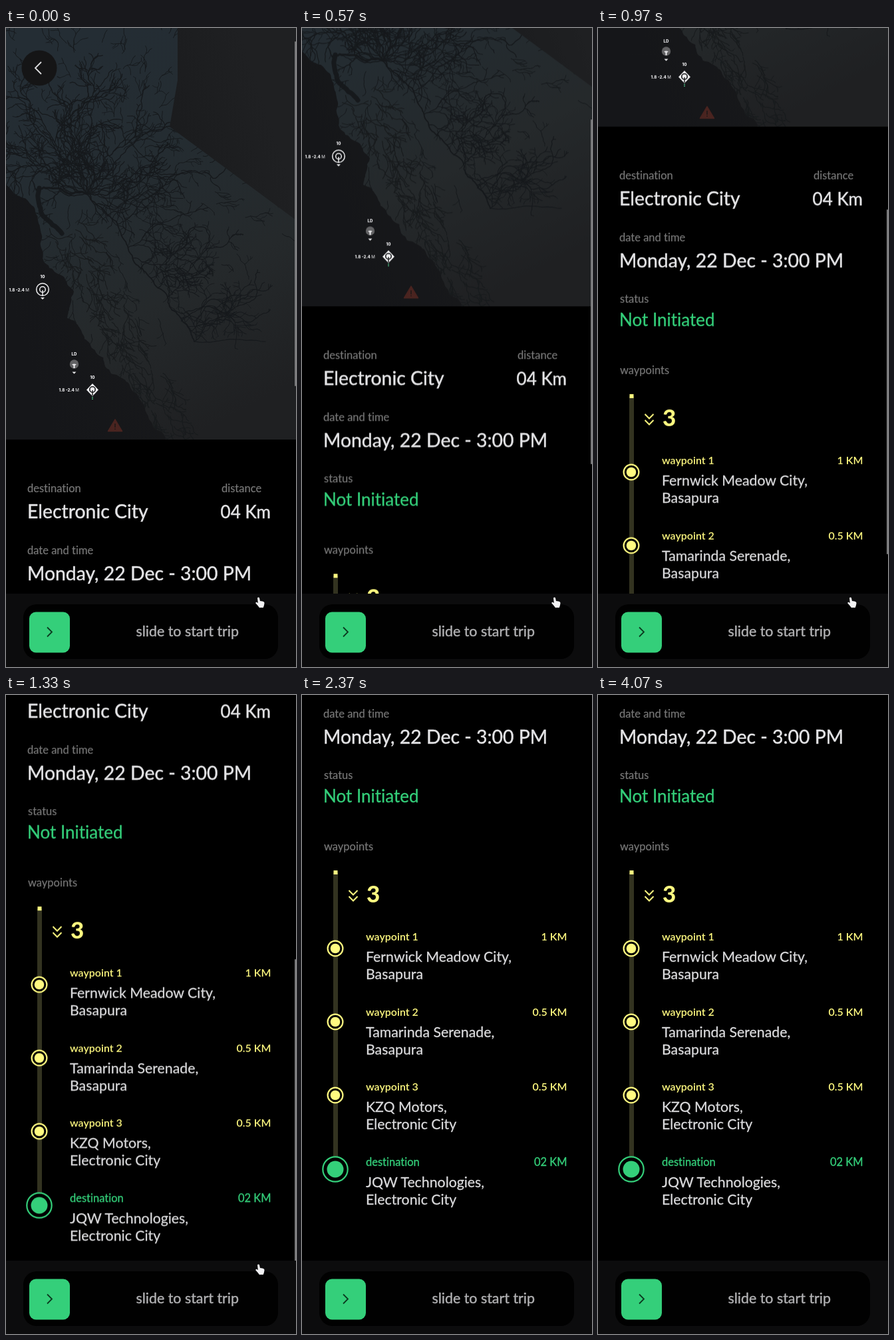
Write an HTML page with a canvas that moves like this. It is 436 by 958 pixels and loops after 4.11 s.

```html
<!DOCTYPE html>
<html lang="en">
<head>
<meta charset="utf-8">
<title>Trip details</title>
<style>
  :root {
    --start: cubic-bezier(.333, .141, .667, .732);
    --glide: cubic-bezier(.333, .434, .667, .726);
    --settle: cubic-bezier(.333, .497, .667, 1);
    --white: #e4e4e6;
    --green: #34cf7a;
    --yellow: #fffa80;
  }
  html, body { margin: 0; width: 100%; height: 100%; overflow: hidden; background: #000; }
  .stage { position: relative; width: 436px; height: 958px; overflow: hidden; background: #000; }
  .page, .page > *, .bar { position: absolute; left: 0; top: 0; }
  .page { animation: scroll 4110ms infinite; will-change: transform; }
  svg { display: block; font-family: Lato, "Open Sans", sans-serif; font-variant-ligatures: none; }
  text { stroke-width: .45px; stroke-linejoin: round; }
  .label { font-size: 16.5px; fill: #787878; stroke: #787878; stroke-width: .2px; }
  .head { font-size: 28.4px; fill: var(--white); stroke: var(--white); }
  .status { font-size: 26px; fill: var(--green); stroke: var(--green); stroke-width: .3px; }
  .name { font-size: 21.3px; fill: #dadadc; stroke: #dadadc; stroke-width: .3px; }
  .stop { font-size: 16px; font-weight: 600; fill: var(--yellow); }
  .goal { font-size: 16.5px; fill: var(--green); stroke: var(--green); stroke-width: .3px; }
  .slide { font-size: 21.4px; fill: #b0b0b2; stroke: #b0b0b2; }
  .mini { font: 800 6.2px Inter, sans-serif; fill: #ececee; }
  .end { text-anchor: end; }
  .mid { text-anchor: middle; }
  .thumb {
    position: absolute; right: 0; top: 0; width: 2px; height: 517px;
    border-radius: 1px; background: #78787a;
    animation: thumb 4110ms infinite, hide 4110ms infinite;
  }
  .hand { animation: hide 4110ms step-end infinite; }

  @keyframes scroll {
    0%, 11.44% { transform: none; animation-timing-function: var(--start); }
    17.03% { transform: translateY(-272px); animation-timing-function: var(--glide); }
    23.6% { transform: translateY(-469px); animation-timing-function: var(--settle); }
    40.88%, 100% { transform: translateY(-755px); }
  }
  @keyframes thumb {
    0%, 10% { transform: translateY(20px); animation-timing-function: ease-in; }
    11.44% { transform: translateY(27px); animation-timing-function: var(--start); }
    17.03% { transform: translateY(177px); animation-timing-function: var(--glide); }
    23.6% { transform: translateY(272px); animation-timing-function: var(--settle); }
    40.88%, 100% { transform: translateY(425px); }
  }
  @keyframes hide { 0%, 46% { opacity: 1; } 51%, 100% { opacity: 0; } }
</style>
</head>
<body>
<div class="stage">
  <div class="page">
    <canvas id="map" width="436" height="617"></canvas>
    <svg width="436" height="1713">
      <circle cx="50" cy="60" r="26.5" fill="#151516"/>
      <path d="M53 51l-9 9 9 9" fill="none" stroke="#dcdcde" stroke-width="1.8"/>

      <g class="mini">
        <text class="mid" x="55" y="375">10</text>
        <text x="4.5" y="394.5">1.8 -2.4 <tspan font-weight="400">M</tspan></text>
        <text class="mid" x="102.5" y="490.5">LD</text>
        <text class="mid" x="130" y="525.5">10</text>
        <text x="79.5" y="545">1.8 -2.4 <tspan font-weight="400">M</tspan></text>
      </g>
      <g fill="none" stroke="#ececee" stroke-width="1.5">
        <circle cx="55" cy="392" r="9.3"/>
        <circle cx="55" cy="392" r="4.3"/>
        <path d="M55 393v9"/>
      </g>
      <path d="M52 404h6l-3 3zM99.5 515.5h6l-3 3z" fill="#ececee"/>
      <circle cx="102.5" cy="504" r="6.7" fill="#626264"/>
      <path d="M99 504.5q3.5-2 7 0l-2.5 1.5v4h-2v-4z" fill="#ececee"/>
      <path d="M130 533l9 9.5-9 9.5-9-9.5z" fill="#f0f0f2"/>
      <circle cx="130" cy="542" r="4.2" fill="none" stroke="#161719" stroke-width="1.6"/>
      <path d="M130 543v8" stroke="#161719" stroke-width="1.4"/>
      <path d="M130 553v1.5m0 1v1.5" stroke="#4fc78a" stroke-width="1.6"/>
      <path d="M164 587l10.5 17.500h-21z" fill="#4a2420" stroke="#4a2420" stroke-width="1.5" stroke-linejoin="round"/>
      <path d="M164 593v6m0 1.500v1.500" stroke="#1a1718" stroke-width="1.4"/>

      <text class="label" x="32" y="696">destination</text>
      <text class="label" x="324" y="696">distance</text>
      <text class="head" x="32" y="734.5">Electronic City</text>
      <text class="head end" x="398" y="734.5" style="font-size:26px">04 Km</text>
      <text class="label" x="32" y="789">date and time</text>
      <text class="head" x="32" y="827.5">Monday, 22 Dec - 3:00 PM</text>
      <text class="label" x="33" y="881">status</text>
      <text class="status" x="32" y="915.5">Not Initiated</text>
      <text class="label" x="33" y="988">waypoints</text>

      <rect x="47" y="1021" width="7" height="430" fill="#333320"/>
      <rect x="47.5" y="1018" width="6" height="6" fill="var(--yellow)"/>
      <path d="M70.5 1048l6.500 6.500 6.500-6.500m-13 9l6.500 6.500 6.500-6.500" fill="none" stroke="var(--yellow)" stroke-width="2"/>
      <text x="97" y="1066" font-size="35" font-weight="800" fill="var(--yellow)">3</text>
      <g id="stops"></g>
    </svg>
  </div>

  <div class="thumb"></div>

  <svg class="bar" width="436" height="958">
    <rect y="848" width="436" height="110" fill="#0c0c0d"/>
    <rect x="26" y="864" width="383" height="82" rx="20" fill="#010101"/>
    <rect x="35" y="875.5" width="61" height="61" rx="10" fill="#34cf7a"/>
    <path d="M62 898.5l7 7-7 7" fill="none" stroke="#0c3a20" stroke-width="1.8"/>
    <text class="slide" x="195.5" y="912">slide to start trip</text>
    <path class="hand" d="M378 854.5q1.600-1.800 3 0l1 4.800 1.300-.4 1.300.7 1.400-.2 1.200.9q1.300.2 1.300 2l-.5 3.200-1.200 3.400h-6l-2.200-3-3.300-3.700q.3-1.800 2-1.200l1.600 1.200z" fill="#f2f2f4"/>
  </svg>
</div>

<script>
const stops = [
  ["waypoint 1", "1 KM", "Fernwick Meadow City,", "Basapura"],
  ["waypoint 2", "0.5 KM", "Tamarinda Serenade,", "Basapura"],
  ["waypoint 3", "0.5 KM", "KZQ Motors,", "Electronic City"],
  ["destination", "02 KM", "JQW Technologies,", "Electronic City"]
];

document.getElementById("stops").innerHTML = stops.map(([title, km, place, area], i) => {
  const goal = i === stops.length - 1;
  const style = goal ? "goal" : "stop";
  const color = goal ? "var(--green)" : "var(--yellow)";
  const y = Math.round(1123 + 112.7 * i);
  const cy = Math.round(1134.500 + 110.400 * i);
  return `<circle cx="50" cy="${cy}" r="${goal ? 18.7 : 11.4}" fill="#000" stroke="${color}" stroke-width="2.2"/>
    <circle cx="50" cy="${cy}" r="${goal ? 12.5 : 7.3}" fill="${color}"/>
    <text class="${style}" x="96" y="${y}">${title}</text>
    <text class="${style} end" x="398.5" y="${y}">${km}</text>
    <text class="name" x="96" y="${y + 32}">${place}</text>
    <text class="name" x="96" y="${y + 58}">${area}</text>`;
}).join("");

const ctx = document.getElementById("map").getContext("2d");
let seed = 71;
const random = () => (seed = seed * 16807 % 2147483647) / 2147483647;
const between = (a, b) => a + (b - a) * random();

function gradient(x0, y0, x1, y1, ...colors) {
  const g = ctx.createLinearGradient(x0, y0, x1, y1);
  colors.forEach((c, i) => g.addColorStop(i / (colors.length - 1), c));
  return g;
}

// Fractal edge from a to b
function rough(a, b, amount) {
  const d = Math.hypot(b[0] - a[0], b[1] - a[1]);
  if (d < 5) return [b];
  const shift = d * amount / 2;
  const mid = a.map((v, i) => (v + b[i]) / 2 + between(-shift, shift));
  return [...rough(a, mid, amount), ...rough(mid, b, amount)];
}

const course = (points, amount = 0.25) =>
  points.flatMap((p, i) => i ? rough(points[i - 1], p, amount) : [p]);

function line(points, width) {
  ctx.lineWidth = width;
  ctx.beginPath();
  points.forEach(p => ctx.lineTo(...p));
  ctx.stroke();
}

// Meandering stream with ever smaller side arms
function creek(x, y, angle, length, width) {
  const points = [[x, y]];
  let a = angle;
  for (let s = 0; s < length; s += 4) {
    a += between(-0.6, 0.6) + (angle - a) * 0.2;
    x += Math.cos(a) * 4;
    y += Math.sin(a) * 4;
    points.push([x, y]);
    if (length > 12 && random() < 0.2) {
      const side = random() < 0.5 ? -0.8 : 0.8;
      creek(x, y, a + side, Math.min(50, (length - s) * 0.6), width * 0.85);
    }
  }
  line(points, width);
}

const delta = [122, 249];
const coast = course([[0, 235], [42, 268], [55, 345], [102, 395], [92, 435], [200, 555], [240, 617]]);
const border = [[436, 617], [436, 288], [246, 148], [258, 78], [258, 0], [0, 0]];

ctx.fillStyle = gradient(0, 400, 436, 250, "#151619", "#18191b", "#1f2022");
ctx.fillRect(0, 0, 436, 617);
ctx.beginPath();
[...coast, ...border].forEach(p => ctx.lineTo(...p));
ctx.fillStyle = gradient(80, 40, 360, 570, "#242d34", "#242c31", "#25292b", "#1f2022");
ctx.fill();
ctx.clip();

ctx.lineJoin = ctx.lineCap = "round";
ctx.strokeStyle = "#16191c";
line(course([[50, 240], [50, 265], [84, 308]]), 7);
line(course([[46, 243], delta]), 3);

const valley = course([delta, [178, 318], [200, 358], [283, 470]]);
line(valley, 1.8);
line(course([[283, 470], [390, 470]], 0.1), 1.2);

// Rivers fan out north of the delta and east of the valley
for (let a = -2.9; a < -0.2; a += 0.19) creek(...delta, a, between(150, 260), 1.4);
valley.forEach(([x, y], i) => {
  if (i % 6 === 0) creek(x, y, between(-0.7, -0.2), between(80, 180), 1.2);
});

// Small streams point away from the delta, sparser to the southeast
for (let i = 0; i < 240; i++) {
  const x = between(0, 436), y = between(0, 480);
  if (x + y < between(420, 800)) {
    creek(x, y, Math.atan2(y - delta[1], x - delta[0]), between(15, 45), 1);
  }
}

// Coastal ridges run parallel to the shore
ctx.strokeStyle = "#181b1d";
for (let i = 0; i < 100; i++) {
  const y = between(285, 610);
  const shore = 45 + (y - 285) * 0.55;
  creek(shore + between(0, 65), y, 0.95, between(15, 45), 1.2);
}
</script>
</body>
</html>
```
